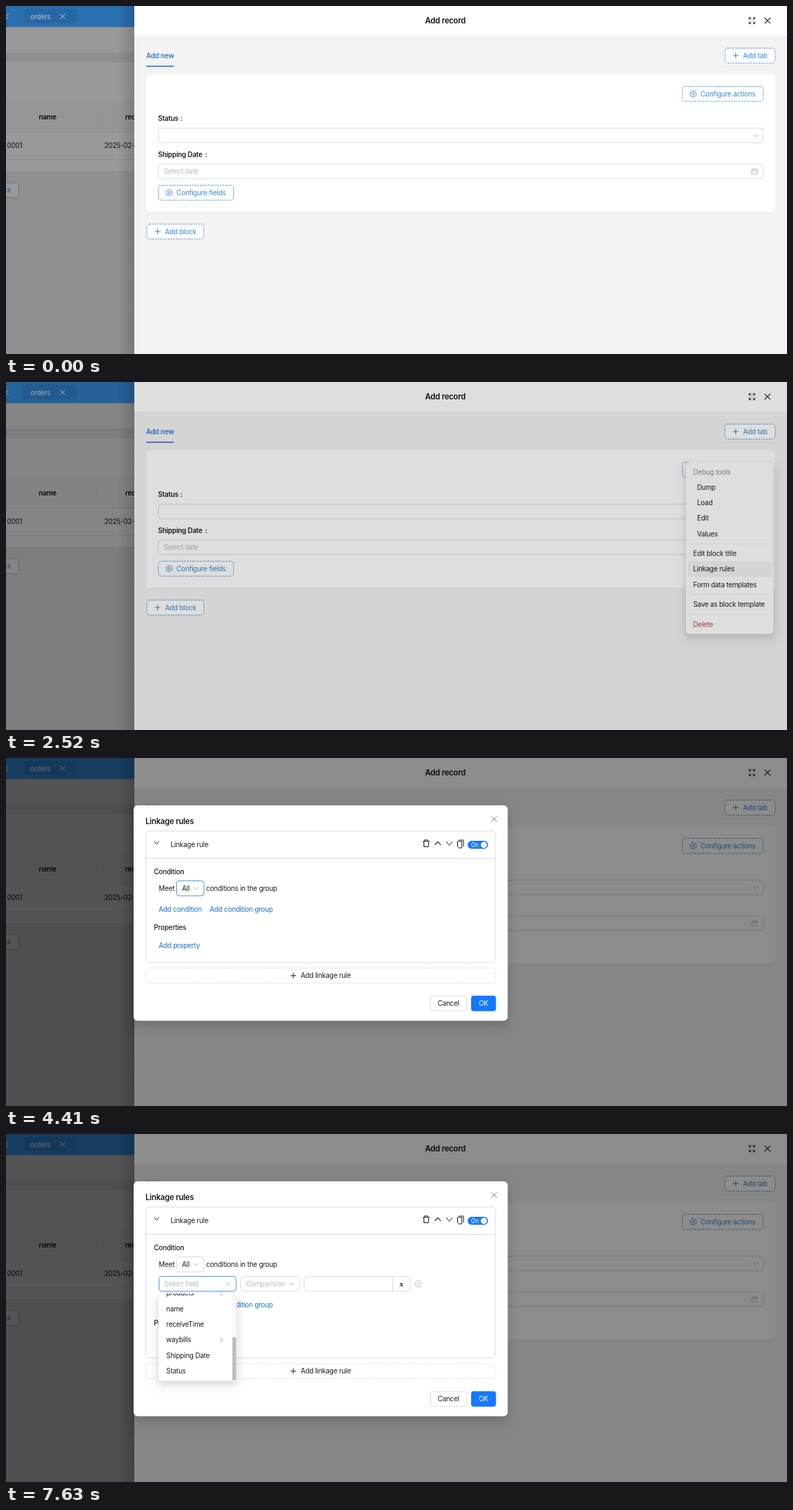
Animation of 1120x500 px, one loop 8000 ms. Source, as an HTML page:

```html
<!DOCTYPE html>
<html lang="en">
<head>
<meta charset="utf-8">
<title>Linkage rules</title>
<style>
html, body { margin: 0; width: 100%; height: 100%; overflow: hidden; background: #f3f3f3; }
svg { display: block; width: 100vw; height: 100vh; }
text { font-family: Inter, "Open Sans", sans-serif; letter-spacing: -.02em; white-space: pre; }
</style>
</head>
<body>
<svg id="stage" viewBox="0 0 1120 500"></svg>
<script>
const LOOP = 8000, STEP = 70;
const INK = '#1c1c1c', LINE = '#d9d9d9', HINT = '#b9b9b9', BRAND = '#3388cf', LINK = '#1b6cc8', PRIMARY = '#1677ff';

// Drawing helpers; y of a text is its visual middle.
const text = (x, y, s, o = {}) => {
  const { size = 9.8, fill = INK, weight = 400, anchor = 'start', extra = '' } = o;
  return `<text x="${x}" y="${y + size * .36}" font-size="${size}" fill="${fill}" font-weight="${weight}" text-anchor="${anchor}" ${extra}>${s}</text>`;
};
const bold = (x, y, s, o = {}) => text(x, y, s, { weight: 600, ...o });
const rect = (x, y, w, h, fill, r = 0, extra = '') =>
  `<rect x="${x}" y="${y}" width="${w}" height="${h}" rx="${r}" fill="${fill}" ${extra}/>`;
const frame = (x, y, w, h, stroke = LINE, o = {}) =>
  rect(x + .5, y + .5, w - 1, h - 1, o.fill || '#fff', o.r || 4,
    `stroke="${stroke}" stroke-width="${o.width || .9}" ${o.dash ? 'stroke-dasharray="2.2 1.5"' : ''} ${o.extra || ''}`);
const path = (d, stroke = INK, w = 1, extra = '') =>
  `<path d="${d}" fill="none" stroke="${stroke}" stroke-width="${w}" ${extra}/>`;
const group = (id, body, extra = '') => `<g id="${id}" ${extra}>${body}</g>`;
const cross = (x, y, r, c, w) => path(`M${x - r} ${y - r}l${2 * r} ${2 * r}m0 ${-2 * r}l${-2 * r} ${2 * r}`, c, w);
const plus = (x, y, c) => path(`M${x - 4} ${y}h8m-4-4v8`, c, 1);
const down = (x, y, c = HINT, r = 3.3) => path(`M${x - r} ${y - r * .55}l${r} ${r * 1.2}l${r} ${-r * 1.2}`, c, 1);
const up = (x, y, r) => path(`M${x - r} ${y + r * .5}l${r} ${-r}l${r} ${r}`, INK, 1.1);
const right = (x, y) => path(`M${x - 2} ${y - 3.3}l4.2 3.3l-4.2 3.3`, '#999', .9);

function gear(x, y, c) {
  let d = '';
  for (let i = 0; i < 24; i++) {
    const a = (i + .5) * Math.PI / 12, r = i % 4 < 2 ? 4.8 : 3.8;
    d += `${i ? 'L' : 'M'}${(x + r * Math.cos(a)).toFixed(2)} ${(y + r * Math.sin(a)).toFixed(2)}`;
  }
  return path(d + 'Z', c, .9) + `<circle cx="${x}" cy="${y}" r="1.6" fill="none" stroke="${c}" stroke-width=".9"/>`;
}

const dashed = (x, y, w, label, icon) =>
  frame(x, y, w, 22.5, BRAND, { dash: true }) + icon(x + 16, y + 11.2, BRAND) + text(x + 26.5, y + 11.2, label, { fill: BRAND });

const shadow = (x, y, w, h) =>
  rect(x - 5, y + 1, w + 10, h + 10, '#000', 9, 'opacity=".06" filter="url(#wide)"') +
  rect(x, y + 4, w, h, '#000', 6, 'opacity=".1" filter="url(#near)"');

function page() {
  const gray = '#8f8f8f', dim = '#2a6ba5';
  return rect(0, 0, 184, 500, gray) +
    rect(0, 0, 184, 30.5, '#2a70b0') + rect(24, 4, 78, 21, '#000', 4, 'opacity=".07"') +
    path('M3.5 11l-4 4l4 4', '#b4c6d6', 1) + text(35, 15, 'orders', { fill: '#b4c6d6' }) + cross(81.3, 15, 3.9, '#b4c6d6', 1) +
    rect(0, 30.5, 184, 36.5, '#999') + rect(0, 81, 184, 156, '#999') +
    rect(0, 136, 184, 45, '#969696') + path('M129.5 152v15M0 181.5h184M0 220.5h184', '#8e8e8e', .8) +
    bold(47, 159, 'name', { fill: '#0c0c0c' }) + bold(171, 159, 'receiveTime', { fill: '#0c0c0c' }) +
    text(1.5, 200.5, '0001', { fill: '#111' }) + text(141, 200.5, '2025-02-14', { fill: '#111' }) +
    frame(-40, 253.5, 58.5, 22.5, dim, { dash: true, fill: '#999' }) + text(7.5, 264.8, 'ck', { fill: dim, anchor: 'end' }) +
    rect(160, 0, 24, 500, 'url(#edge)');
}

function drawer() {
  return rect(184, 0, 936, 500, '#f3f3f3') + rect(184, 0, 936, 43, '#fff') + path('M184 43h936', '#ededed', .8) +
    bold(630, 21, 'Add record', { size: 11.2, anchor: 'middle', fill: '#111' }) +
    path('M1065.8 19.5v-2.8h2.8m-2.6 .2l2.7 2.7M1071 16.7h2.8v2.8m-.2-2.6l-2.7 2.7M1073.8 22.5v2.8h-2.8m2.6-.2l-2.7-2.7M1068.6 25.3h-2.8v-2.8m.2 2.6l2.7-2.7', INK, 1) +
    cross(1092, 21, 4.2, INK, 1.2) +
    path('M201 87.2h902', '#ebebeb', .8) + text(201, 71, 'Add new', { fill: '#1a66d6', weight: 500 }) + rect(201, 85.8, 39.5, 1.5, '#1a66d6') +
    dashed(1030.5, 60, 73, 'Add tab', plus) +
    rect(201, 99, 902, 198, '#000', 5.6, 'opacity=".04"') + rect(201, 98, 902, 198, '#fff', 5.6) +
    dashed(969.5, 115, 117, 'Configure actions', gear) +
    bold(218, 161.5, 'Status') + bold(250, 161.5, ':') + frame(218, 175, 868.5, 22) + down(1074.8, 186) +
    bold(218, 213, 'Shipping Date') + bold(285.5, 213, ':') + frame(218, 226.5, 868.5, 22) +
    text(226.3, 237.5, 'Select date', { fill: HINT }) +
    path('M1069.5 234.5h8v7h-8zM1069.5 237h8M1071.5 233v2.5M1075.5 233v2.5', HINT, .9) +
    dashed(218, 257, 109, 'Configure fields', gear) + dashed(201.5, 312.8, 82.5, 'Add block', plus) +
    group('hover', rect(201, 98, 902, 198, '#f18b62', 5.6, 'opacity=".06"') +
      [1077, 1090].map(x => rect(x, 99.5, 11.3, 11.3, '#f18b62', 1)).join('') +
      path('M1082.6 101.5v7.3M1079 105.1h7.3M1092.5 103h6.3m-6.3 2.1h6.3m-6.3 2.1h6.3', '#fff', .9));
}

function menu() {
  const rows = [[991, 151, 'Dump'], [991, 173.5, 'Load'], [991, 195.7, 'Edit'], [991, 218, 'Values'],
    [985.5, 246.5, 'Edit block title'], [985.5, 268.8, 'Linkage rules'], [985.5, 291.2, 'Form data templates'], [985.5, 319.8, 'Save as block template']];
  return shadow(975, 115, 125.5, 247) + rect(975, 115, 125.5, 247, '#fff', 5.6) +
    rect(978, 0, 120, 22.4, '#f3f3f3', 3, 'id="row"') +
    text(985.5, 129, 'Debug tools', { fill: '#8a8a8a' }) + rows.map(r => text(...r)).join('') +
    path('M981 232.5h112M981 305.3h112M981 333.8h112', '#ececec', .9) + text(985.5, 348.3, 'Delete', { fill: '#c03c40' });
}

function emptyBox() {
  const pale = '#dce0e6';
  return frame(200, 104.5, 502.5, 125.5, '#f0f0f0', { r: 5.6 }) +
    '<ellipse cx="451" cy="185.5" rx="31" ry="4.5" fill="#f3f3f4"/>' +
    '<path d="M433 160h36l7.3 8.5h-50z" fill="#aeb8c2"/>' + rect(433.8, 136.8, 34.5, 40, '#f4f5f7', 1.5) +
    rect(439, 141, 24.7, 13, pale, .7) + rect(439, 159.6, 24.7, 1.4, pale) + rect(439, 164.8, 24.7, 1.4, pale) +
    `<path d="M426.3 168H439c1.6 0 2 4.8 3.8 4.8h17c1.8 0 2-4.8 3.8-4.8h12.7v17q0 2-2 2h-46q-2 0-2-2z" fill="${pale}"/>` +
    `<ellipse cx="483" cy="130.2" rx="10.3" ry="8.2" fill="${pale}"/><path d="M476 134l-2.2 5l6-1.5z" fill="${pale}"/>` +
    [478.8, 483, 487.2].map(x => `<circle cx="${x}" cy="130.2" r="1.2" fill="#fff"/>`).join('') +
    text(451, 204.7, 'No data', { fill: '#7d7d7d', anchor: 'middle' }) + path('M200 237.3h502.5', '#c8c8c8', 1);
}

function rule() {
  const row = frame(219, 204, 111.5, 22.5, LINE, { extra: 'id="field"' }) + text(226.8, 215.2, 'Select field', { fill: HINT }) + down(318.3, 215.2) +
    frame(336, 204, 85.5, 22.5) + text(344, 215.2, 'Comparision', { fill: HINT }) + down(409.3, 215.2) +
    frame(427, 204, 153.5, 22.5) + path('M554.5 204.5v21.5', LINE, .9) +
    '<text x="567" y="219" font-size="10.5" text-anchor="middle" style="font-family:\'Liberation Serif\',serif;font-style:italic;font-weight:600">x</text>' +
    '<circle cx="591" cy="215.2" r="4.6" fill="none" stroke="#aaa" stroke-width=".8"/>' + cross(591, 215.2, 1.8, '#aaa', .8);
  const tail = text(219, 217.3, 'Add condition', { fill: LINK, extra: 'id="add"' }) + text(292, 217.3, 'Add condition group', { fill: LINK }) +
    text(212, 243.8, 'Properties', { weight: 500 }) + text(219, 269.6, 'Add property', { fill: LINK });
  return rect(200.5, 105, 501.5, 189, '#fff', 5.6, `id="panel" stroke="${LINE}" stroke-width=".9"`) +
    down(216, 121.5, INK, 3.5) + text(236, 124, 'Linkage rule') +
    path('M597.8 119.7h9.6M600.5 119.5v-1.8h4.2v1.8M599 120l.5 7.5h6.2l.5-7.5', INK, 1.1) + up(619.2, 122.6, 4.4) + down(635.7, 122.6, INK, 4.4) +
    path('M647.5 119.7h6.2v9.5h-4l-2.2-2.2zM649.3 118h6.8v9', INK, 1) +
    rect(662, 119, 29.3, 11.5, PRIMARY, 5.7) + text(667, 124.8, 'On', { size: 8.4, fill: '#fff' }) + '<circle cx="685.3" cy="124.8" r="4.4" fill="#fff"/>' +
    path('M200.5 144.5h501.5', LINE, .9) +
    `<g clip-path="url(#fold)">${group('content', text(212, 163.5, 'Condition', { weight: 500 }) + text(219, 187.3, 'Meet') +
      frame(244, 176, 40.5, 22.5, LINE, { extra: 'id="all"' }) + text(252.3, 187.3, 'All') + down(272.6, 187.3) +
      text(287, 187.3, 'conditions in the group') + group('cond', row) + group('tail', tail))}</g>`;
}

function modal() {
  return `<g id="glow">${shadow(183, 68, 536.5, 253)}</g>` + rect(183, 68, 536.5, 253, '#fff', 5.6, 'id="sheet"') +
    bold(200, 90.5, 'Linkage rules', { size: 11.2 }) + cross(700, 87.7, 4, '#777', 1) +
    group('empty', emptyBox()) + group('rule', rule()) +
    group('foot', frame(200, 245, 502.5, 22.5, LINE, { dash: true }) + plus(412, 256.3, INK) + text(422.7, 256.3, 'Add linkage rule') +
      frame(608, 285, 53.5, 22.3) + text(634.5, 296.1, 'Cancel', { anchor: 'middle' }) +
      rect(667, 285, 35.7, 22.3, PRIMARY, 4) + text(684.8, 296.1, 'OK', { fill: '#fff', anchor: 'middle' }));
}

const FIELDS = ['ID', 'Created at', 'Created by', 'Last updated at', 'Last updated by', 'products', 'name', 'receiveTime', 'waybills', 'Shipping Date', 'Status'];
const PARENTS = ['Created by', 'Last updated by', 'products', 'waybills'];
function picker() {
  const items = FIELDS.map((f, i) => {
    const y = 243 + 22.3 * i;
    return text(229.8, y, f) + (PARENTS.includes(f) ? right(309, y) : '');
  }).join('');
  return shadow(218.8, 229, 111.7, 125.7) + rect(218.8, 229, 111.7, 125.7, '#fff', 4) +
    `<g clip-path="url(#list)">${group('items', items)}</g>` + rect(324, 229, 6.5, 125.7, '#f7f7f7') +
    rect(324.7, 229.5, 5.3, 62, '#bcbcbc', 1, 'id="thumb"');
}

const stage = document.getElementById('stage');
stage.innerHTML = `<defs>
  <filter id="wide" x="-30%" y="-30%" width="160%" height="160%"><feGaussianBlur stdDeviation="8"/></filter>
  <filter id="near" x="-30%" y="-30%" width="160%" height="160%"><feGaussianBlur stdDeviation="4.5"/></filter>
  <linearGradient id="edge"><stop stop-opacity="0"/><stop offset="1" stop-opacity=".16"/></linearGradient>
  <clipPath id="fold"><rect id="foldBox" x="200" y="145" width="503" height="0"/></clipPath>
  <clipPath id="list"><rect x="219" y="229" width="111.5" height="125.7"/></clipPath></defs>` +
  page() + drawer() + group('menu', menu()) + rect(0, 0, 1120, 500, '#000', 0, 'id="mask"') +
  group('modal', modal()) + group('picker', picker());

const el = {};
stage.querySelectorAll('[id]').forEach(n => el[n.id] = n);
const set = (id, attrs) => { for (const k in attrs) el[id].setAttribute(k, attrs[k]); };
const show = (id, on) => set(id, { display: on ? 'inline' : 'none' });
const part = (t, from, span) => Math.min(1, Math.max(0, (t - from) / span));
const quint = p => 1 - (1 - p) ** 5;
const inOut = p => p < .5 ? 4 * p ** 3 : 1 - 4 * (1 - p) ** 3;
const between = (t, a, b) => t >= a && t < b;
const zoom = (x, y, sx, sy) => `translate(${x} ${y}) scale(${sx} ${sy}) translate(${-x} ${-y})`;

function drop(id, y, p, opacity = p) {
  show(id, opacity > 0);
  set(id, { opacity, transform: zoom(0, y, 1, .8 + .2 * p) });
}

function draw(now) {
  const t = Math.floor((now % LOOP) / STEP) * STEP;

  show('hover', between(t, 490, 1750));
  set('hover', { opacity: t < 560 ? .5 : 1 });

  drop('menu', 115, quint(part(t, 1160, 200)), quint(part(t, 1160, 200)) * (1 - part(t, 2520, 140)));
  show('row', t >= 1890);
  set('row', { y: t < 2100 ? 235.3 : 257.6 });

  set('mask', { opacity: .45 * part(t, 2450, 240) });
  const open = part(t, 2520, 280), scale = .2 + .8 * (1 - (1 - open) ** 3);
  show('modal', open > 0);
  set('modal', { opacity: 1 - (1 - open) ** 3, transform: zoom(1015, 269, scale, scale) });

  const added = t >= 3500, withRow = t >= 5250;
  const fold = inOut(part(t, 3450, 400));
  const bottom = !added ? 237.5 : withRow ? 322 : 144.5 + 149.5 * fold;
  show('empty', !added);
  show('rule', added);
  set('panel', { height: Math.max(0, bottom - 105) });
  set('foldBox', { height: Math.max(0, bottom - 145) });
  set('content', { opacity: fold });
  set('sheet', { height: bottom + 83.5 - 68 });
  set('glow', { transform: zoom(0, 68, 1, (bottom + 15.5) / 253) });
  set('foot', { transform: `translate(0 ${bottom - 237.5})` });
  show('cond', withRow);
  set('tail', { transform: `translate(0 ${withRow ? 28 : 0})` });
  set('all', { stroke: between(t, 4130, 4970) ? (t < 4200 || t >= 4900 ? '#8fbce0' : '#3a8fd8') : LINE });
  set('add', { fill: between(t, 5110, 5250) ? '#4d9be8' : LINK });
  set('field', { stroke: t >= 6020 ? '#3a8fe0' : LINE });

  drop('picker', 229, quint(part(t, 5986, 200)));
  const scroll = (1 - Math.cos(Math.PI * part(t, 6930, 700))) / 2;
  set('items', { transform: `translate(0 ${-125.6 * scroll})` });
  set('thumb', { y: 229.8 + 62.3 * scroll });
}

const start = performance.now();
(function tick() {
  draw(performance.now() - start);
  requestAnimationFrame(tick);
})();
</script>
</body>
</html>
```
